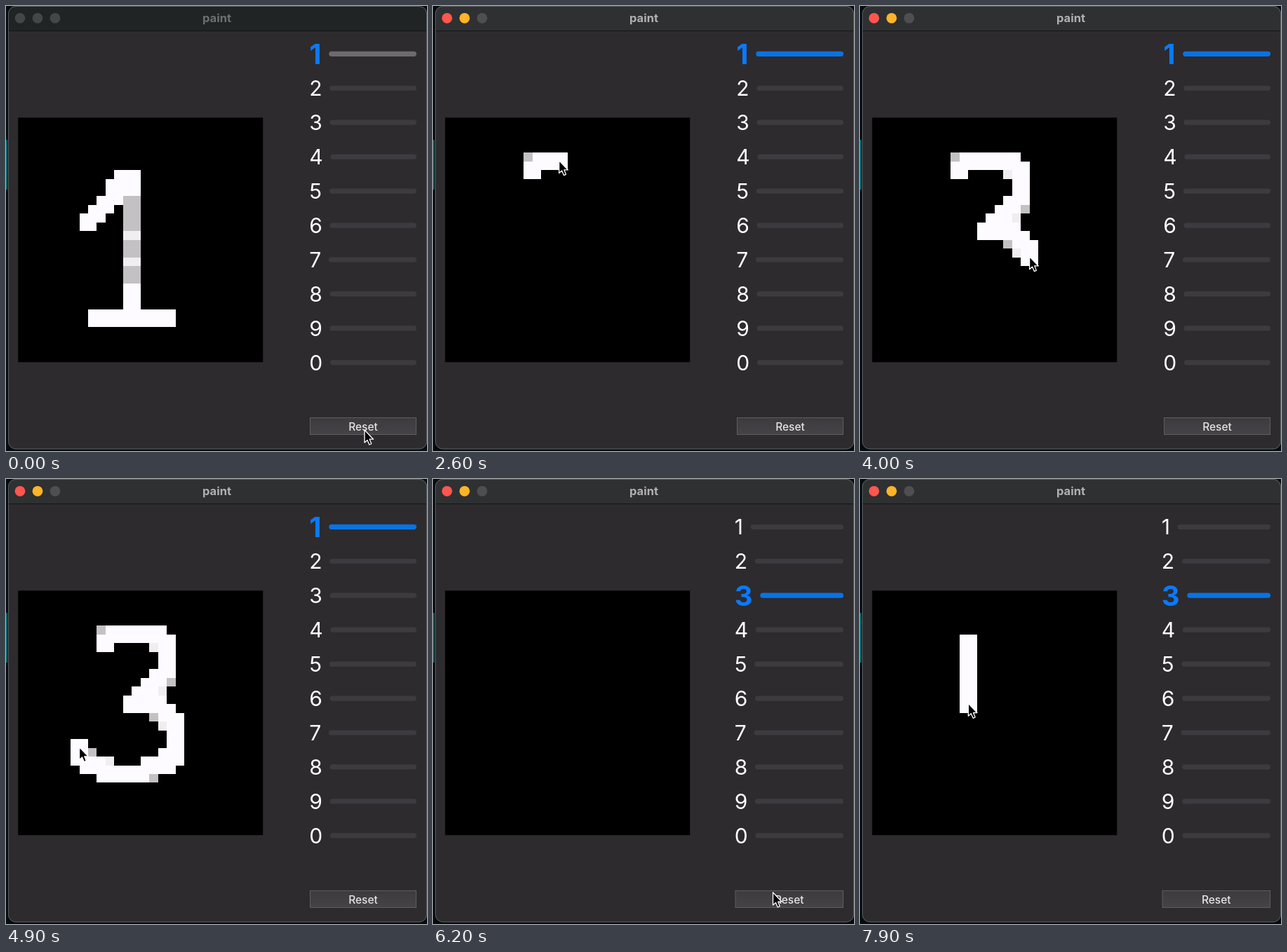
Animation of 600 by 635 pixels, one loop 8000 ms. Source, as an HTML page:

```html
<!DOCTYPE html>
<html lang="en">
<head>
<meta charset="utf-8">
<title>paint</title>
<style>
  html, body { margin: 0; width: 100%; height: 100%; overflow: hidden; background: #050a0c; }
  svg { display: block; width: 100vw; height: 100vh; }
  text { font-family: Inter, Roboto, sans-serif; }
  .title { font-size: 16.5px; font-weight: 700; text-anchor: middle; }
  .reset { font-size: 15.5px; font-weight: 500; fill: #e4e3e4; text-anchor: middle; }
</style>
</head>
<body>
<svg id="stage" viewBox="0 0 600 635" preserveAspectRatio="none">
  <defs>
    <linearGradient id="face" x2="0" y2="1">
      <stop stop-color="#3d3b3e"/><stop offset="1" stop-color="#454347"/>
    </linearGradient>
    <clipPath id="frame"><rect x="3" width="597" height="632.5" rx="11"/></clipPath>
  </defs>
  <rect width="600" height="635" fill="#050c0f"/>
  <rect y="191" width="2" height="71" fill="#06666c"/>
  <g clip-path="url(#frame)">
    <rect width="600" height="635" fill="#2d2b2d"/>
    <rect id="bar" width="600" height="35"/>
    <rect y="35" width="600" height="1" fill="#121314"/>
  </g>
  <rect x="3.5" y=".5" width="596" height="631.5" rx="10.5" fill="none" stroke="#5b5e60"/>
  <g id="lights"></g>
  <text id="title" class="title" x="300.5" y="22.5">paint</text>
  <rect x="17.3" y="159.3" width="348.9" height="348.9"/>
  <g id="cells" shape-rendering="crispEdges"></g>
  <g id="rows"></g>
  <rect id="button" y="587.5" height="24" fill="url(#face)" stroke="#5f5d61"/>
  <text id="reset" class="reset" y="605.5">Reset</text>
  <path id="cursor" d="M0 0V18L4 14.4 6.8 21 9.8 19.7 7.2 13.2H12.6Z"
        fill="#000" stroke="#fff" stroke-width="1.3" stroke-linejoin="round"/>
</svg>
<script>
const LOOP = 8000, STEP = 100;
const ACTIVE_AT = 700, CLEAR_AT = 800, GUESS_AT = 5200, RESET_AT = 6200;
const CELL = 348.9 / 28, LEFT = 17.3, TOP = 159.3, RIGHT = 585;
const WHITE = '#fdfbff', LIGHT = '#f0eef1', GRAY = '#c3c1c3';
const $ = id => document.getElementById(id);

function set(el, attrs) {
  for (const key in attrs) el.setAttribute(key, attrs[key]);
}
function add(parent, tag, attrs = {}) {
  const el = document.createElementNS('http://www.w3.org/2000/svg', tag);
  set(el, attrs);
  return parent.appendChild(el);
}

const cells = [];
function paint(c, r, size, fill, on, off) {
  const el = add($('cells'), 'rect', {
    x: LEFT + c * CELL, y: TOP + r * CELL, width: size * CELL, height: CELL * Math.min(size, 2), fill
  });
  cells.push({ el, on, off });
}

// Walks cell by cell through the key points at an even pace.
function walk(points, from, to) {
  const steps = [points[0]];
  points.slice(1).forEach(([c1, r1], i) => {
    const [c0, r0] = points[i];
    const n = Math.max(Math.abs(c1 - c0), Math.abs(r1 - r0));
    for (let k = 1; k <= n; k++)
      steps.push([c0 + Math.round((c1 - c0) * k / n), r0 + Math.round((r1 - r0) * k / n)]);
  });
  return steps.map(([c, r], i) => ({ c, r, t: from + (to - from) * i / (steps.length - 1) }));
}

// Each diagonal move leaves a soft cell at its trailing side, alternately gray and light.
function soften(steps, off) {
  let count = 0;
  steps.slice(1).forEach(({ c, r, t }, i) => {
    const last = steps[i];
    if (c === last.c || r === last.r) return;
    const col = c > last.c ? last.c : last.c + 1;
    const row = r > last.r ? r + 1 : r;
    paint(col, row, 1, count++ % 2 ? LIGHT : GRAY, t, off);
  });
}

function brush(steps, off) {
  for (const { c, r, t } of steps) paint(c, r, 2, WHITE, t, off);
}

brush(walk([[7, 11], [10, 8], [10, 7], [11, 6], [12, 6], [12, 22], [8, 22], [16, 22]], 0, 0), CLEAR_AT);
for (let r = 9; r < 19; r++)
  for (const c of [12, 13])
    paint(c, r, 1, r > 10 && r % 3 === 1 ? LIGHT : GRAY, 0, CLEAR_AT);

const upper = walk([[9, 5], [10, 4], [15, 4], [16, 5], [16, 8], [12, 12], [15, 12], [17, 14], [17, 15]], 2350, 4000);
const lower = walk([[17, 15], [17, 18], [16, 18], [16, 19], [14, 19], [13, 20], [9, 20], [8, 19], [7, 19], [6, 18], [6, 17]], 4000, 4900);
for (const part of [upper, lower]) {
  soften(part, RESET_AT);
  brush(part, RESET_AT);
}

const line = walk([[10, 5], [10, 12]], 7500, 7900);
brush(line, LOOP);

const follow = steps => steps.map(({ c, r, t }) => [t, LEFT + (c + 1) * CELL, TOP + (r + 1) * CELL - 1]);
const cursorKeys = [
  [0, 511, 605], [900, 511, 605], [1100, 270, 423], [1500, 160, 252],
  ...follow(upper), ...follow(lower),
  [5400, 104, 388], [6100, 484.5, 590], [6300, 484.5, 590], [7300, 155, 234],
  ...follow(line), [LOOP, 155, 320]
];
function cursorAt(t) {
  const i = cursorKeys.findIndex(key => key[0] > t);
  const [t0, x0, y0] = cursorKeys[i - 1], [t1, x1, y1] = cursorKeys[i];
  const p = (t - t0) / (t1 - t0);
  return [x0 + (x1 - x0) * p, y0 + (y1 - y0) * p];
}

const lights = [20, 45, 70].map(cx => add($('lights'), 'circle', { cx, cy: 17.3, r: 7.4 }));
const rows = Array.from({ length: 10 }, (_, i) => {
  const label = add($('rows'), 'text');
  label.textContent = (i + 1) % 10;
  const y = 68.4 + i * 48.95;
  const track = add($('rows'), 'rect', { y: y - 3.7, height: 7.2, rx: 3.6 });
  return { y, label, track };
});

function drawWindow(active) {
  set($('bar'), { fill: active ? '#2f3032' : '#202425' });
  set($('title'), { fill: active ? '#b1b0b2' : '#6d7071' });
  const colors = active ? ['#ff564f', '#ffb429', '#4f4f51'] : Array(3).fill('#444748');
  lights.forEach((el, i) => set(el, { fill: colors[i] }));
}

// Each track fills the space that its label leaves.
function drawGuess(digit, left, active) {
  rows.forEach(({ y, label, track }, i) => {
    const hit = i + 1 === digit;
    const size = hit ? 40 : 30;
    set(label, {
      x: left - 0.7, y: y + size * 0.36, 'font-size': size,
      'font-weight': hit ? 700 : 400, fill: hit ? '#0a7aff' : '#fff'
    });
    const x = left + label.getComputedTextLength() + 10;
    set(track, {
      x, width: RIGHT - x,
      fill: !hit ? '#3d3b3f' : active ? '#0873e6' : '#6d6b6d'
    });
  });
  set($('button'), { x: left + 0.5, width: RIGHT - left - 1 });
  set($('reset'), { x: (left + RIGHT) / 2 });
}

function draw(now) {
  const t = Math.floor(now % LOOP / STEP) * STEP;
  const active = t >= ACTIVE_AT;
  drawWindow(active);
  if (t < GUESS_AT) drawGuess(1, 433, active);
  else drawGuess(3, 430.5, active);
  for (const { el, on, off } of cells)
    el.style.display = t >= on && t < off ? '' : 'none';
  set($('cursor'), { transform: `translate(${cursorAt(t)})` });
}

const begin = performance.now();
function tick() {
  draw(performance.now() - begin);
  requestAnimationFrame(tick);
}
tick();
</script>
</body>
</html>
```
